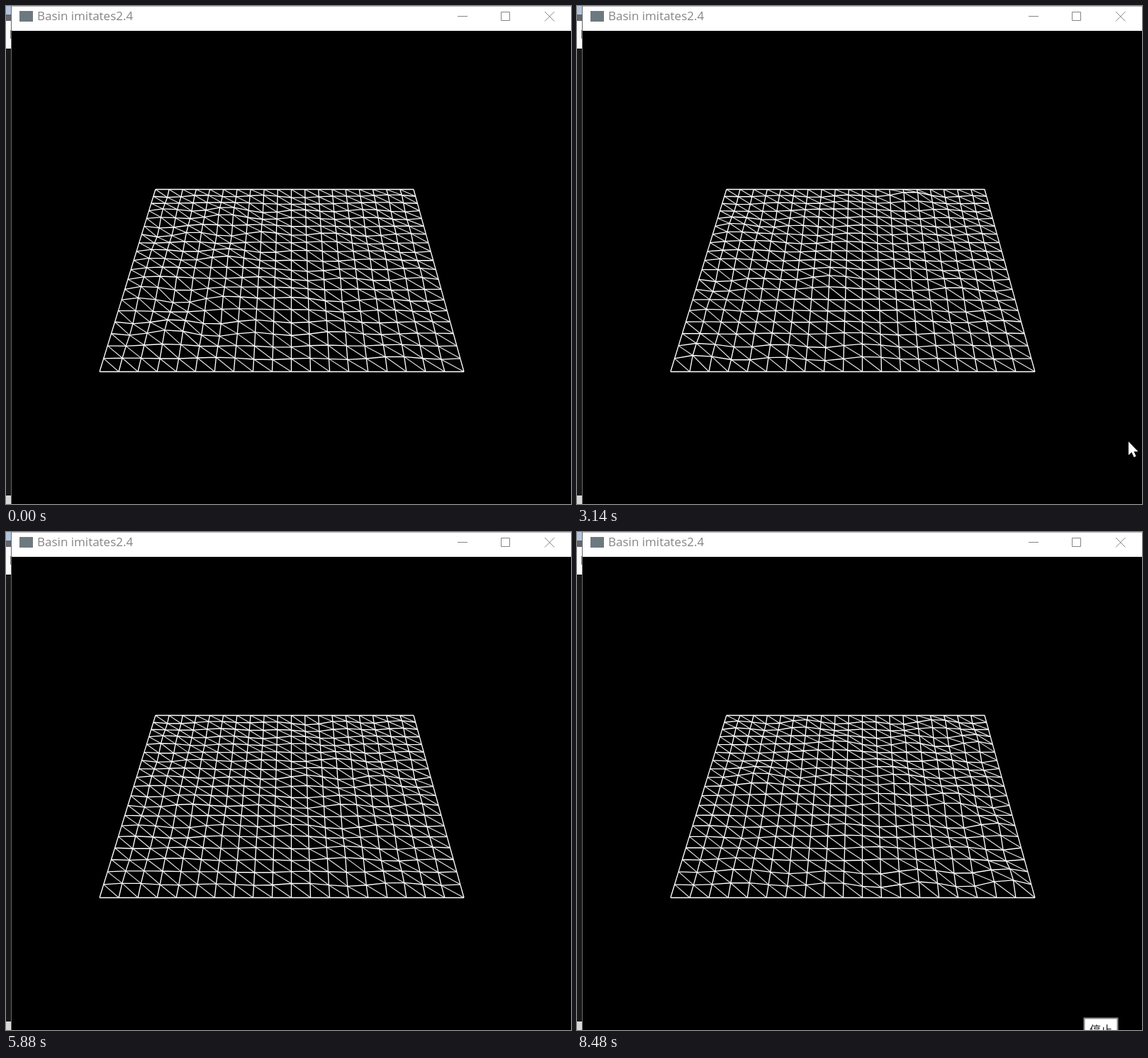
Write an HTML page with a canvas that moves like this. It is 797x702 px and loops after 8.55 s.

```html
<!DOCTYPE html>
<html lang="en">
<head>
<meta charset="utf-8">
<title>Water mesh</title>
<style>
  html, body { margin: 0; width: 100%; height: 100%; overflow: hidden; background: #000; }
  canvas, svg { position: absolute; left: 0; top: 0; display: block; }
  .title { font: 17px "Open Sans", "Noto Sans", sans-serif; fill: #858585; }
  .label { font: 16px "Noto Sans CJK SC", "Noto Sans CJK", sans-serif; fill: #222; }
  .icons { fill: none; stroke: #858585; stroke-width: 1; }
  #cursor { animation: cursor 8.55s linear infinite; }
  #stop { animation: stop 8.55s step-end infinite; }
  @keyframes cursor {
    0%, 4.9% { transform: translate(772px, 706px); }
    9.4%, 57.4% { transform: translate(778px, 614px); }
    59.1% { transform: translate(774px, 679px); }
    60.2%, 100% { transform: translate(772px, 706px); }
  }
  @keyframes stop {
    0% { opacity: 0; }
    80.4%, 100% { opacity: 1; }
  }
</style>
</head>
<body>
<canvas id="water" width="797" height="702"></canvas>
<svg width="797" height="702" viewBox="0 0 797 702">
  <!-- sliver of the window behind -->
  <rect width="8" height="702" fill="#181818"/>
  <rect width="8" height="12" fill="#b4c3dc"/>
  <rect y="12" width="8" height="9" fill="#63666d"/>
  <rect y="21" width="8" height="39" fill="#fafafa"/>
  <rect x="6" y="34" width="1" height="12" fill="#777"/>
  <rect y="690" width="8" height="12" fill="#d8d8d8"/>
  <rect x="7" width="1" height="702" fill="#6a6a6a"/>

  <!-- title bar -->
  <rect x="8" width="789" height="35" fill="#fff"/>
  <rect x="8" width="789" height="1" fill="#b5b5b5"/>
  <rect x="19" y="7" width="19" height="15" fill="#6c7a80"/>
  <text class="title" x="44" y="20">Basin imitates2.4</text>
  <g class="icons">
    <path d="M637 14.5h14M698.5 8.5h12v12h-12zM760 8l13.5 13.5M773.5 8L760 21.5"/>
  </g>

  <g id="stop">
    <rect x="715.5" y="685.5" width="47" height="30" fill="#fff" stroke="#8c8c8c" stroke-width="2"/>
    <text class="label" x="723" y="708">停止</text>
  </g>
  <path id="cursor" d="M0 0V19L4.4 15L7.6 22L10.6 20.7L7.6 14H13.5Z" fill="#fff"/>
</svg>
<script>
const ctx = document.getElementById('water').getContext('2d');
const LOOP = 8550, STEPS = 122, N = 19;

// Camera over a flat grid, one unit per cell
const CX = 402.5, CY = 430, TOP = 258.5, BOTTOM = 515.5;
const NEAR = 27.05, FAR = 19.16, FOCAL = 960, SIN = 0.638, COS = 0.77;
const rowScale = j => 1 / (1 / NEAR + (1 / FAR - 1 / NEAR) * j / N);
const rowY = s => TOP + (BOTTOM - TOP) * (s - FAR) / (NEAR - FAR);

function project(i, j, h) {
  const s = rowScale(j);
  const lifted = FOCAL / (FOCAL / s - SIN * h);
  return [CX + (i - 10) * lifted, CY + ((rowY(s) - CY) / s - COS * h) * lifted];
}

function unproject(x, y) {
  const s = FAR + (y - TOP) / (BOTTOM - TOP) * (NEAR - FAR);
  return [10 + (x - CX) / s, N * (1 / s - 1 / NEAR) / (1 / FAR - 1 / NEAR)];
}

// Standing waves pinned at the rim
let seed = 41;
const random = () => (seed = (seed * 16807) % 2147483647) / 2147483647;
const modes = Array.from({ length: 20 }, () => {
  const m = 3 + Math.floor(random() * 7), n = 3 + Math.floor(random() * 7);
  return { m, n, rate: 0.75 * Math.hypot(m, n), phase: random() * 2 * Math.PI };
});

// Swells: peak time in seconds, then screen points of their crests
const swells = [
  [0, [320, 362], [213, 380], [350, 405], [300, 300]],
  [1.82, [325, 285], [438, 345], [335, 368], [415, 405]],
  [3.14, [370, 385], [385, 288], [475, 265], [225, 332]],
  [4.06, [265, 432], [425, 400], [355, 300], [375, 460]],
  [5.05, [220, 288], [205, 410], [370, 325], [465, 410]],
  [6.66, [380, 390], [445, 275], [450, 385], [365, 282]],
  [8.48, [370, 358], [265, 352], [345, 300], [450, 362]]
].flatMap(([at, ...points]) => points.map(([x, y]) => {
  const [i, j] = unproject(x, y);
  return { at, i, j };
}));

function height(i, j, t, live) {
  if (i % N === 0 || j % N === 0) return 0;
  let h = 0;
  for (const w of modes) {
    h += 0.04 * Math.sin(w.m * Math.PI * i / N) * Math.sin(w.n * Math.PI * j / N)
       * Math.cos(w.rate * t + w.phase);
  }
  for (const b of live) {
    h += b.level * Math.exp(-((i - b.i) ** 2 + (j - b.j) ** 2) / 3);
  }
  return h;
}

function draw(t) {
  const live = swells.map(b => {
    const dt = t - b.at;
    return { i: b.i, j: b.j, level: 0.25 * Math.cos(4.5 * dt) * Math.exp(-dt * dt / 0.5) };
  }).filter(b => Math.abs(b.level) > 0.002);

  const grid = [];
  for (let j = 0; j <= N; j++) {
    grid.push(Array.from({ length: N + 1 }, (_, i) => project(i, j, height(i, j, t, live))));
  }

  ctx.fillStyle = '#000';
  ctx.fillRect(0, 0, 797, 702);
  const mesh = new Path2D(), diagonals = new Path2D();
  const line = (path, a, b) => { path.moveTo(...a); path.lineTo(...b); };
  for (let j = 0; j <= N; j++) {
    for (let i = 0; i <= N; i++) {
      if (i < N) line(mesh, grid[j][i], grid[j][i + 1]);
      if (j < N) line(mesh, grid[j][i], grid[j + 1][i]);
      if (i < N && j < N) line(diagonals, grid[j + 1][i], grid[j][i + 1]);
    }
  }
  ctx.lineWidth = 1.15;
  ctx.strokeStyle = '#e4e4e4';
  ctx.stroke(diagonals);
  ctx.lineWidth = 1.35;
  ctx.strokeStyle = '#fff';
  ctx.stroke(mesh);
}

const start = performance.now();
let shown = -1;
function tick() {
  const t = (performance.now() - start) % LOOP;
  const step = Math.min(STEPS - 1, Math.floor(t / LOOP * STEPS + 0.1));
  if (step !== shown) {
    shown = step;
    draw(step * LOOP / STEPS / 1000);
  }
  requestAnimationFrame(tick);
}
tick();
</script>
</body>
</html>
```
